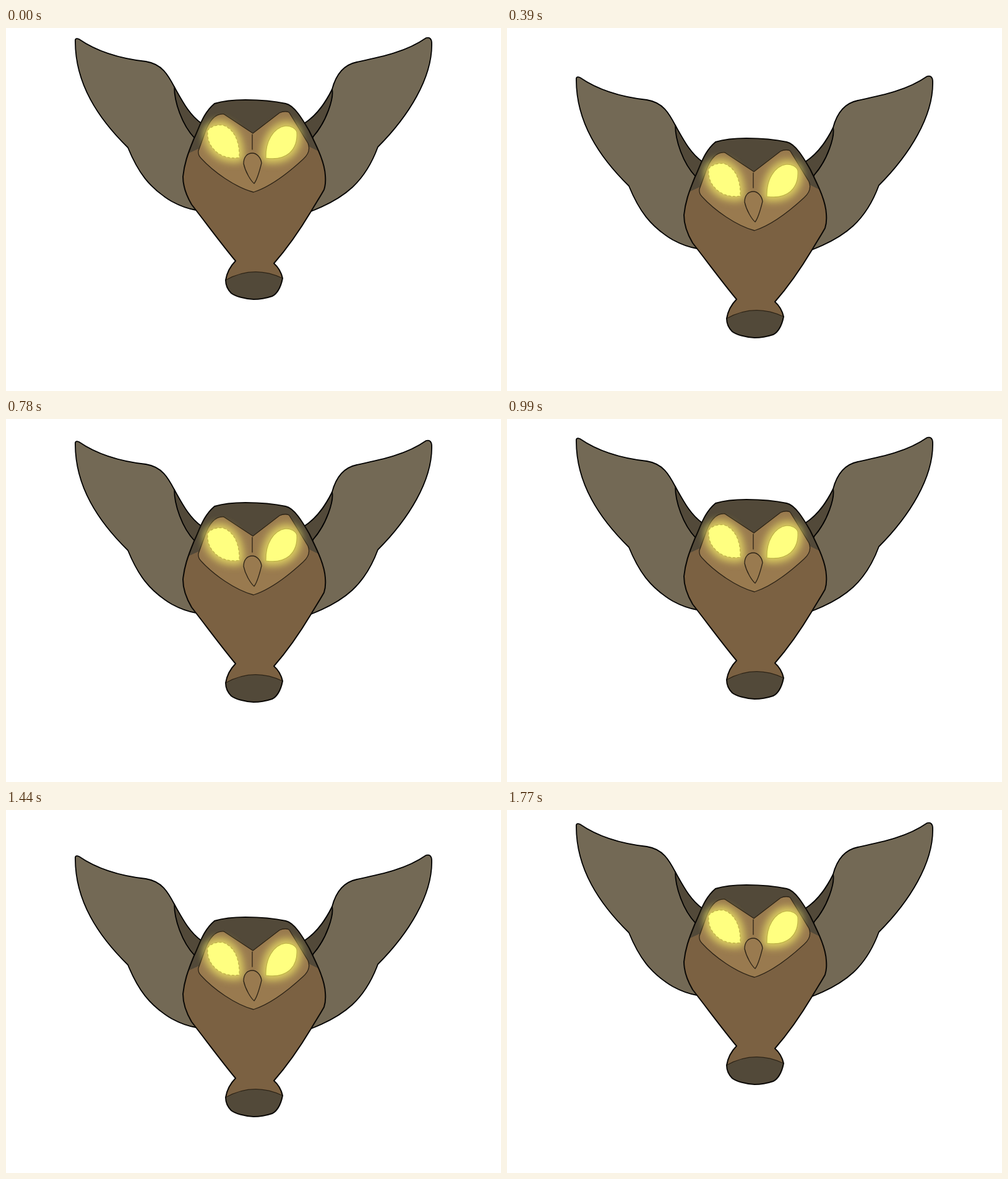
Write an HTML page that moves like this. It is 800 px wide and 586 px high and loops after 1800 ms.

```html
<!DOCTYPE html>
<html lang="en">
<head>
<meta charset="utf-8">
<title>Hovering owl</title>
<style>
  html, body { margin: 0; width: 100%; height: 100%; overflow: hidden; background: #fff; }
  svg { display: block; width: 100vw; height: 100vh; }
  .wing { fill: #736955; stroke: #000; stroke-width: 1.8; }
  .dark { fill: #524939; }
  .inner { stroke: #000; stroke-width: 1.8; }
  .body { fill: #7b6142; }
  .face { fill: #997a4f; }
  .eyes { fill: #ffff80; }
  .outline { fill: none; stroke: #0a0805; stroke-width: 2; }
  .fine { stroke: #2c2316; stroke-width: 1.3; }
  .rim { fill: none; stroke: #bcb145; stroke-width: 1.2; }
  .glow { fill: #eee466; stroke: #eee466; stroke-width: 14; opacity: .8; }
</style>
</head>
<body>
<svg viewBox="0 0 800 586" stroke-linejoin="round" stroke-linecap="round">
  <defs>
    <path id="body" d="M337 122C350 118 370 116 387 116C415 116 438 119 452 122C466 125 479 147 490 166C500 187 515 215 516 238C517 250 515 258 514 261C508 272 500 284 493 296C475 326 455 355 433 380C441 387 445 395 447 404C444 420 437 430 430 433C418 437 408 438 400 438C385 437 370 433 364 428C356 420 355 412 355 407C357 395 363 384 371 376C350 351 325 317 300 285C290 268 286 252 286 240C288 220 293 205 304 178C313 160 318 138 337 122Z"/>
    <path id="leftEye" d="M326 165C333 157 344 156 351 157C368 163 378 182 377 209C360 212 345 206 337 197C328 188 325 178 326 165Z"/>
    <path id="rightEye" d="M470 168C468 162 461 158 452 158C432 161 419 183 420 210C440 213 451 208 458 202C468 193 471 182 470 168Z"/>
    <clipPath id="inside"><use href="#body"/></clipPath>
    <filter id="blur" x="-60%" y="-60%" width="220%" height="220%"><feGaussianBlur stdDeviation="6.5"/></filter>
  </defs>
  <g id="owl">
    <path class="wing" d="M112 19Q113 16 118 18C150 40 190 50 226 54C252 58 262 76 272 95L306 178L320 292L307 294C295 292 279 286 268 280C231 258 213 232 197 193C150 147 111 90 112 19Z"/>
    <path class="wing" d="M688 23Q687 14 679 16C646 39 605 47 567 55C542 60 532 80 527 99L496 176L480 294L493 296C547 275 580 249 601 192C650 143 690 80 688 23Z"/>
    <path class="dark inner" d="M272 95C285 118 296 140 316 154L320 175L305 178C284 156 272 119 272 95Z"/>
    <path class="dark inner" d="M527 99C517 119 504 140 482 154L480 172L496 176C519 150 530 112 527 99Z"/>
    <use href="#body" class="body"/>
    <g clip-path="url(#inside)">
      <path class="dark" d="M280 100H520V206L489 191L400 180L311 195L280 209Z"/>
      <path class="dark fine" d="M355 407Q400 382 447 404L460 450H340Z"/>
    </g>
    <use href="#body" class="outline"/>
    <path class="face fine" d="M311 198L322 168C330 146 340 138 352 139L399 170L442 137C448 134 456 134 458 137L488 186C492 196 488 205 480 212C455 235 425 257 400 265C370 257 335 232 315 210Q310 205 311 198Z"/>
    <path class="fine" d="M398 172V196"/>
    <g clip-path="url(#inside)">
      <g class="glow" filter="url(#blur)">
        <use href="#leftEye"/><use href="#rightEye"/>
      </g>
    </g>
    <path class="face fine" d="M384 219C384 208 390 202 398 202C406 202 412 210 413 218C410 230 406 245 401 251C396 247 387 233 384 219Z"/>
    <g class="eyes"><use href="#leftEye"/><use href="#rightEye"/></g>
    <use href="#leftEye" class="rim" stroke-dasharray="3 4"/>
    <use href="#rightEye" class="rim"/>
  </g>
</svg>
<script>
  const owl = document.getElementById('owl');
  const STEP = 30, CYCLE = 900, DROP = 71;

  // Linear bob: down for half a cycle, then back up.
  function draw(now) {
    const t = Math.floor(now / STEP) * STEP % CYCLE;
    const phase = 1 - Math.abs(1 - 2 * t / CYCLE);
    owl.setAttribute('transform', `translate(0 ${Math.round(DROP * phase)})`);
  }

  let start;
  function tick(now) {
    start ??= now;
    draw(now - start);
    requestAnimationFrame(tick);
  }
  draw(0);
  requestAnimationFrame(tick);
</script>
</body>
</html>
```
